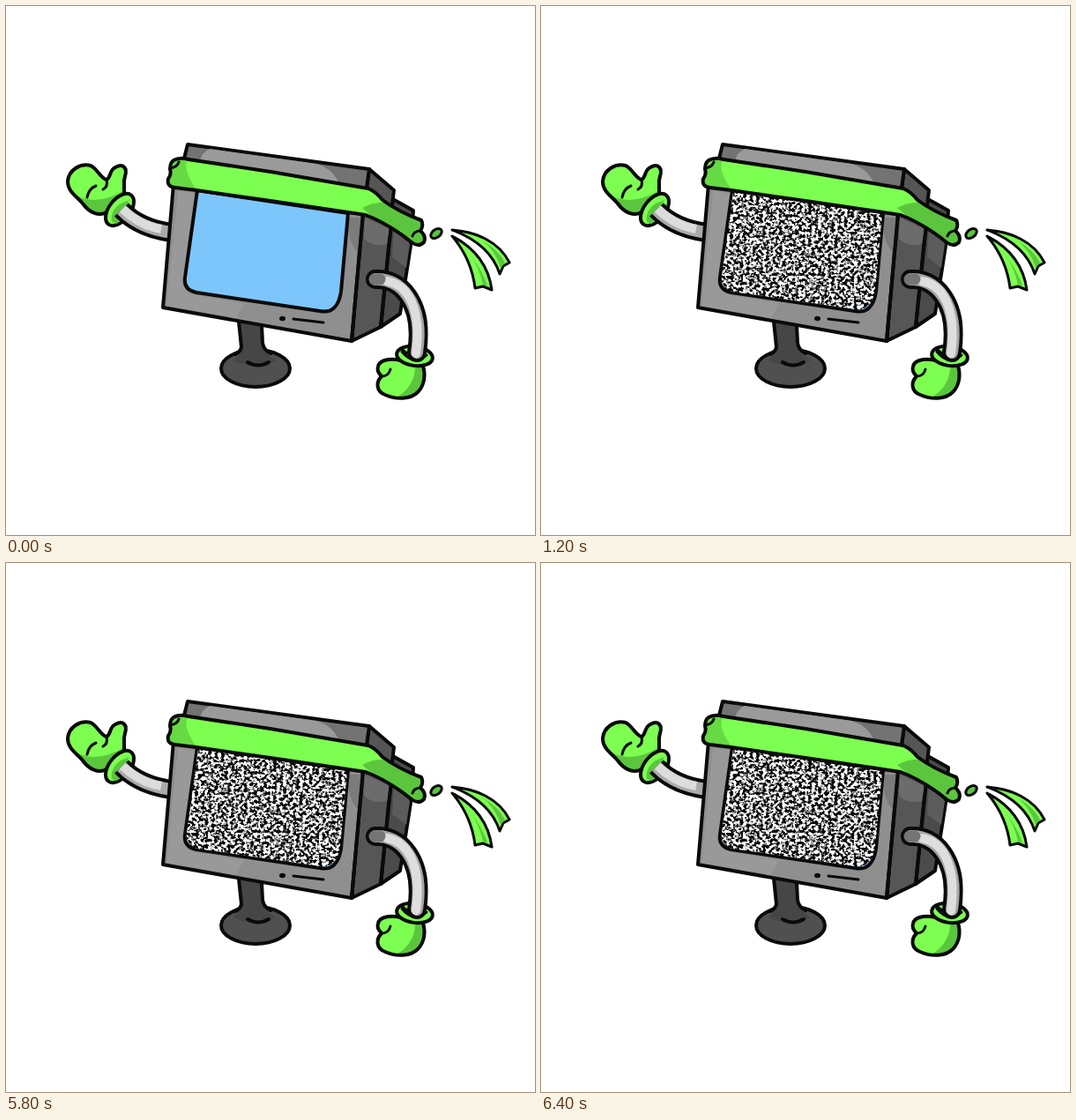
Recreate the animation shown at these times as an HTML page. Size 600 by 600 pixels, loop 6.5 s.

```html
<!DOCTYPE html>
<html lang="en">
<head>
<meta charset="utf-8">
<title>Monitor mascot</title>
<style>
  html, body { margin: 0; width: 100%; height: 100%; overflow: hidden; background: #fff; }
  svg { display: block; width: 100vw; height: 100vh; }
  .ink { stroke: #0a0a0a; stroke-width: 4; stroke-linejoin: round; stroke-linecap: round; }
  .thin { stroke-width: 3; }
  .line { fill: none; }
  .lime { fill: #7cff50; }
  .leaf { fill: #5bc63d; }
  .caption { font: 500 26.5px Inter, "Open Sans", sans-serif; text-anchor: middle; fill: #0a0a0a; }
</style>
</head>
<body>
<svg viewBox="0 0 600 600">
  <defs>
    <clipPath id="glass"><path d="M218 211L387 236L379 322Q375 346 357 344L217 324Q203 320 205 307Z"/></clipPath>
    <clipPath id="bandShape"><use href="#band"/></clipPath>
    <clipPath id="leftHand"><use href="#leftMitten"/></clipPath>
    <clipPath id="rightHand"><use href="#rightMitten"/></clipPath>
    <path id="band" d="M190 175Q197 171 207 174L300 188L411 207Q420 211 427 220Q446 234 471 243Q474 249 470 255Q477 261 474 268Q468 274 460 268Q434 247 408 237L300 221L216 209L192 206Q182 205 184 196Q188 191 186 185Q186 178 190 175Z"/>
    <path id="leftMitten" d="M70 199C71 186 84 178 96 181C104 185 107 195 114 197C119 195 117 186 124 183C133 178 138 184 135 193C132 202 136 207 133 216L115 233C106 240 94 234 87 224C79 215 70 210 70 199Z"/>
    <path id="rightMitten" d="M443 401C433 400 423 402 422 409C420 414 424 418 426 420C419 427 420 437 430 441C443 447 459 446 467 438C475 430 476 418 473 408Z"/>
    <path id="leftArm" d="M131 231Q151 252 188 257"/>
    <path id="rightArm" d="M419 310C446 308 475 336 466 393"/>
  </defs>

  <!-- stand -->
  <ellipse class="ink" cx="283" cy="411" rx="39" ry="21" fill="#505050"/>
  <path d="M264 358L267 385Q265 396 258 402Q282 414 306 402Q293 395 291 382L290 362Z" fill="#464646"/>
  <path class="ink line" d="M264 358L267 387Q266 392 260 395M290 362L291 382Q292 390 300 394M274 404Q286 411 298 404"/>

  <!-- left glove -->
  <use href="#leftMitten" class="lime"/>
  <path clip-path="url(#leftHand)" class="leaf" d="M78 214Q103 228 134 209L130 242H87Z"/>
  <use href="#leftMitten" class="ink line"/>
  <path class="ink line thin" d="M92 217Q94 207 102 204M114 197Q116 205 110 208"/>
  <ellipse class="ink lime" cx="129" cy="231" rx="12" ry="21" transform="rotate(38 129 231)"/>
  <path class="leaf" d="M120 245Q118 232 130 224L140 220L126 247Z"/>

  <!-- left arm -->
  <g class="line">
    <use href="#leftArm" stroke="#0a0a0a" stroke-width="22"/>
    <use href="#leftArm" stroke="#ababab" stroke-width="14"/>
    <path d="M132 230Q152 249 176 253" stroke="#dcdcdc" stroke-width="10"/>
  </g>

  <!-- casing -->
  <path class="ink" fill="#4b4b4b" d="M437 218L462 232L459 272L447 349L425 364L436 246Z"/>
  <path d="M440 252L458 270L454 297L438 285Z" fill="#5c5c5c"/>
  <path class="ink" fill="#565656" d="M404 236L437 244L425 364L392 380Z"/>
  <path d="M407 240L435 253L432 270Q416 274 406 264Z" fill="#6c6c6c"/>
  <path class="ink line" d="M437 248L425 364"/>
  <path class="ink" fill="#555" d="M412 185L440 209L437 234L408 215Z"/>
  <path class="ink" fill="#737373" d="M206 157L412 185L408 213L199 185Z"/>
  <path d="M231 162L352 179Q370 184 377 200L220 176Q222 166 231 162Z" fill="#9a9a9a"/>
  <path class="ink" fill="#8f8f8f" d="M190 202L405 234L392 380L178 342Z"/>
  <path d="M195 210L216 213L203 310Q202 326 215 328L270 337L261 354L182 340Z" fill="#999"/>
  <path d="M389 240L403 240L399 280Q390 270 388 252Z" fill="#7b7b7b"/>
  <path class="ink line" d="M405 235L392 380"/>
  <ellipse cx="313.5" cy="354.5" rx="3.5" ry="2.7" fill="#0a0a0a"/>
  <path class="ink line thin" d="M326 355L360 359"/>

  <!-- screen -->
  <path class="ink" fill="#7dc6fb" d="M217 209L388 235L380 324Q376 350 356 346L216 325Q201 322 203 308Z"/>
  <g id="static" clip-path="url(#glass)"></g>
  <g id="caption" class="caption" transform="translate(299 246) rotate(8)">
    <text>Who are the</text>
    <text y="37.5">Keeper of</text>
    <text y="75">Thimbles?</text>
  </g>

  <!-- headband -->
  <use href="#band" class="lime"/>
  <g clip-path="url(#bandShape)" class="leaf">
    <path d="M180 170L207 172Q198 185 219 212L180 208Z" opacity=".65"/>
    <path d="M404 229Q422 220 434 224L480 248V280L440 260Z"/>
  </g>
  <use href="#band" class="ink line"/>
  <path class="ink line thin" d="M186 184Q194 183 196 177M470 255Q463 255 461 261"/>
  <ellipse class="ink leaf thin" cx="488" cy="258" rx="7" ry="4.5" transform="rotate(-38 488 258)"/>
  <g class="ink lime thin">
    <path d="M506 254C533 256 559 267 571 291L564 295L560 304Q549 270 506 254Z"/>
    <path d="M506 261C529 273 547 292 551 322L541 318L532 320Q528 287 506 261Z"/>
  </g>
  <path class="leaf" d="M540 266Q559 277 566 291L561 297Q555 277 540 266ZM527 283Q540 300 546 317L541 316Q537 297 527 283Z"/>

  <!-- right glove -->
  <use href="#rightMitten" class="lime"/>
  <path clip-path="url(#rightHand)" class="leaf" d="M476 407V450H430Q463 438 464 410Z"/>
  <use href="#rightMitten" class="ink line"/>
  <path class="ink line thin" d="M426 420Q434 420 436 412"/>
  <ellipse class="ink lime" cx="463.5" cy="397" rx="20.5" ry="11" transform="rotate(8 463.5 397)"/>
  <path class="ink leaf thin" d="M449 392Q462 408 477 396Q463 402 450 390Z"/>

  <!-- right arm -->
  <g class="line">
    <use href="#rightArm" stroke="#0a0a0a" stroke-width="22" stroke-linecap="round" clip-path="inset(0)"/>
    <use href="#rightArm" stroke="#a6a6a6" stroke-width="14" stroke-linecap="round"/>
    <path d="M432 312C455 316 472 342 465 394" stroke="#dedede" stroke-width="10" stroke-linecap="round"/>
    <path d="M418 310H424" stroke="#757575" stroke-width="13" stroke-linecap="round"/>
  </g>
</svg>
<script>
const LOOP = 6500;
const STEP = 100;
const staticLayer = document.getElementById('static');
const caption = document.getElementById('caption');

// Smooth noise pushed to high contrast gives the speckled screen.
function addNoise(id, seed, tint) {
  const gray = '0 0 0 6.5 -2.75 ';
  const area = 'x="200" y="205" width="192" height="150"';
  staticLayer.insertAdjacentHTML('beforeend', `
    <filter id="${id}" filterUnits="userSpaceOnUse" ${area} color-interpolation-filters="sRGB">
      <feTurbulence type="fractalNoise" baseFrequency=".27 .3" numOctaves="2" seed="${seed}"/>
      <feColorMatrix values="${gray.repeat(3)} 0 0 0 0 1"/>
      <feComponentTransfer>
        <feFuncR type="table" tableValues=".04 1"/>
        <feFuncG type="table" tableValues=".04 ${tint}"/>
        <feFuncB type="table" tableValues=".04 ${tint}"/>
      </feComponentTransfer>
    </filter>
    <rect ${area} filter="url(#${id})"/>`);
  return staticLayer.lastElementChild;
}

const noises = [addNoise('cool', 4, 1), addNoise('warm', 17, 0.96)];
const show = (node, on) => node.setAttribute('visibility', on ? 'visible' : 'hidden');

function render(time) {
  const t = time % LOOP;
  const captionOn = t >= 1400 && t < 5700;
  const staticOn = t >= 800 && !captionOn;
  const phase = Math.floor(t / STEP) % 2;
  show(caption, captionOn);
  noises.forEach((noise, i) => show(noise, staticOn && i === phase));
}

const start = performance.now();
function tick() {
  render(performance.now() - start);
  requestAnimationFrame(tick);
}
tick();
</script>
</body>
</html>
```
